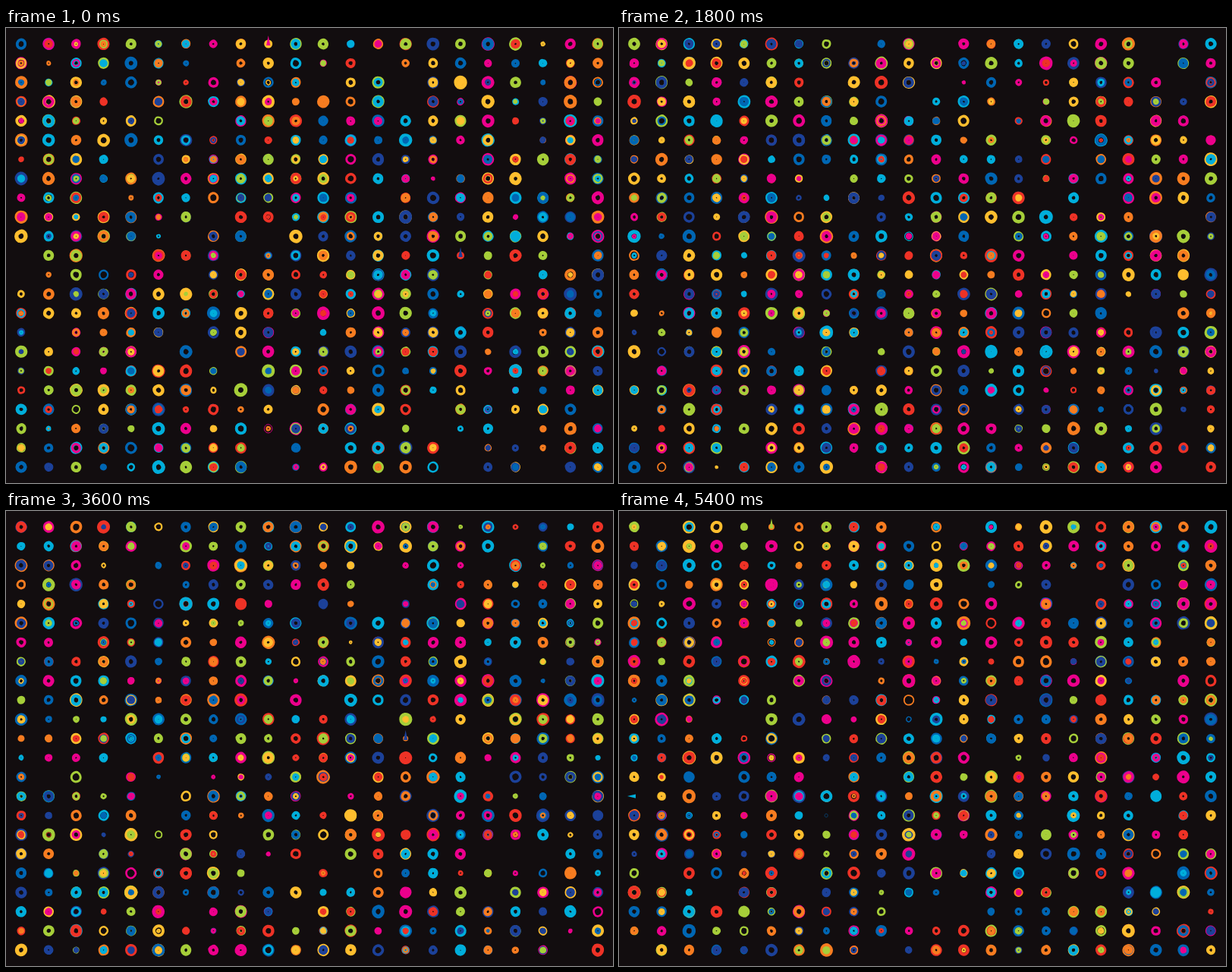
These frames come from a looping animation (800 by 600 pixels, 6 s). An HTML page with a canvas:

```html
<!DOCTYPE html>
<html lang="en">
<head>
<meta charset="utf-8">
<title>Dot grid</title>
<style>
  html, body { margin: 0; width: 100%; height: 100%; overflow: hidden; background: #120d0f; }
  canvas { display: block; width: 800px; height: 600px; }
</style>
</head>
<body>
<canvas id="stage" width="800" height="600"></canvas>
<script>
const ctx = document.getElementById('stage').getContext('2d');
const COLS = 22, ROWS = 23, STEPS = 10, STEP_MS = 600;
const BACKGROUND = '#120d0f';
const color = {
  yellow: '#ffbe2e', orange: '#f77c20', red: '#ee3226', magenta: '#ec008c',
  cyan: '#00aedb', blue: '#0066b3', navy: '#1c4199', green: '#a6ce39'
};
const palette = Object.values(color);

// Rare cells with a sharp point: step, column, row, point colour, dot colour, dot radius, turn
const spikes = [
  [0, 9, 0, 'magenta', 'yellow', 5.5, 0],
  [0, 16, 11, 'navy', 'red', 5, 0],
  [1, 16, 0, 'cyan', 'magenta', 8, 0],
  [1, 21, 0, 'magenta', '', 0, 0.7],
  [2, 20, 11, 'blue', '', 0, 0],
  [2, 15, 22, 'cyan', '', 0, 0],
  [6, 14, 11, 'navy', 'orange', 3.5, 0],
  [7, 1, 22, 'green', '', 0, 0],
  [9, 5, 0, 'green', 'orange', 4, 0],
  [9, 0, 14, 'cyan', '', 0, -Math.PI / 2]
];

function randomFrom(seed) {
  return () => {
    seed = (seed + 0x6d2b79f5) | 0;
    let v = Math.imul(seed ^ (seed >>> 15), 1 | seed);
    v = (v + Math.imul(v ^ (v >>> 7), 61 | v)) ^ v;
    return ((v ^ (v >>> 14)) >>> 0) / 4294967296;
  };
}

// Closed, slightly uneven loop through the midpoints of its corners
function wobblyRing(x, y, { radius, weight, stroke }, random) {
  const count = 9;
  const points = Array.from({ length: count }, (_, i) => {
    const angle = i / count * Math.PI * 2;
    const r = radius * 1.03 + (random() - 0.5) * 0.8;
    return [x + Math.cos(angle) * r, y + Math.sin(angle) * r * 1.03];
  });
  const middle = (a, b) => [(a[0] + b[0]) / 2, (a[1] + b[1]) / 2];
  ctx.beginPath();
  ctx.moveTo(...middle(points[count - 1], points[0]));
  points.forEach((p, i) => ctx.quadraticCurveTo(...p, ...middle(p, points[(i + 1) % count])));
  ctx.closePath();
  ctx.lineWidth = weight;
  ctx.strokeStyle = stroke;
  ctx.stroke();
}

// Up to three rings, the widest at the bottom, so that cores stay visible
function drawDot(x, y, random) {
  const rings = [];
  for (let layer = 0; layer < 3; layer++) {
    if (random() > 0.56) continue;
    rings.push({
      radius: 1 + 5.4 * Math.pow(random(), 0.7),
      weight: 0.3 + 5.1 * Math.pow(random(), 0.28),
      stroke: palette[Math.floor(random() * palette.length)]
    });
  }
  rings.sort((a, b) => b.radius - a.radius);
  rings.forEach(ring => wobblyRing(x, y, ring, random));
}

function drawSpike(x, y, [, , , point, dot, radius, turn]) {
  ctx.save();
  ctx.translate(x, y);
  ctx.rotate(turn);
  if (dot) {
    ctx.fillStyle = color[dot];
    ctx.beginPath();
    ctx.arc(0, 0, radius, 0, Math.PI * 2);
    ctx.fill();
  }
  ctx.fillStyle = color[point];
  ctx.beginPath();
  ctx.moveTo(0, dot ? -11 : -9);
  ctx.lineTo(2.6, 2);
  ctx.lineTo(-2.6, 2);
  ctx.fill();
  ctx.restore();
}

function drawStep(step) {
  const random = randomFrom(7919 * (step + 1));
  ctx.fillStyle = BACKGROUND;
  ctx.fillRect(0, 0, 800, 600);
  for (let row = 0; row < ROWS; row++) {
    for (let col = 0; col < COLS; col++) {
      const x = 20 + col * 760 / (COLS - 1);
      const y = 21 + row * 558 / (ROWS - 1);
      const spike = spikes.find(s => s[0] === step && s[1] === col && s[2] === row);
      if (spike) drawSpike(x, y, spike);
      else drawDot(x, y, random);
    }
  }
}

const start = performance.now();
let shown = -1;
function tick() {
  const step = Math.floor((performance.now() - start) / STEP_MS) % STEPS;
  if (step !== shown) drawStep(shown = step);
  requestAnimationFrame(tick);
}
tick();
</script>
</body>
</html>
```
